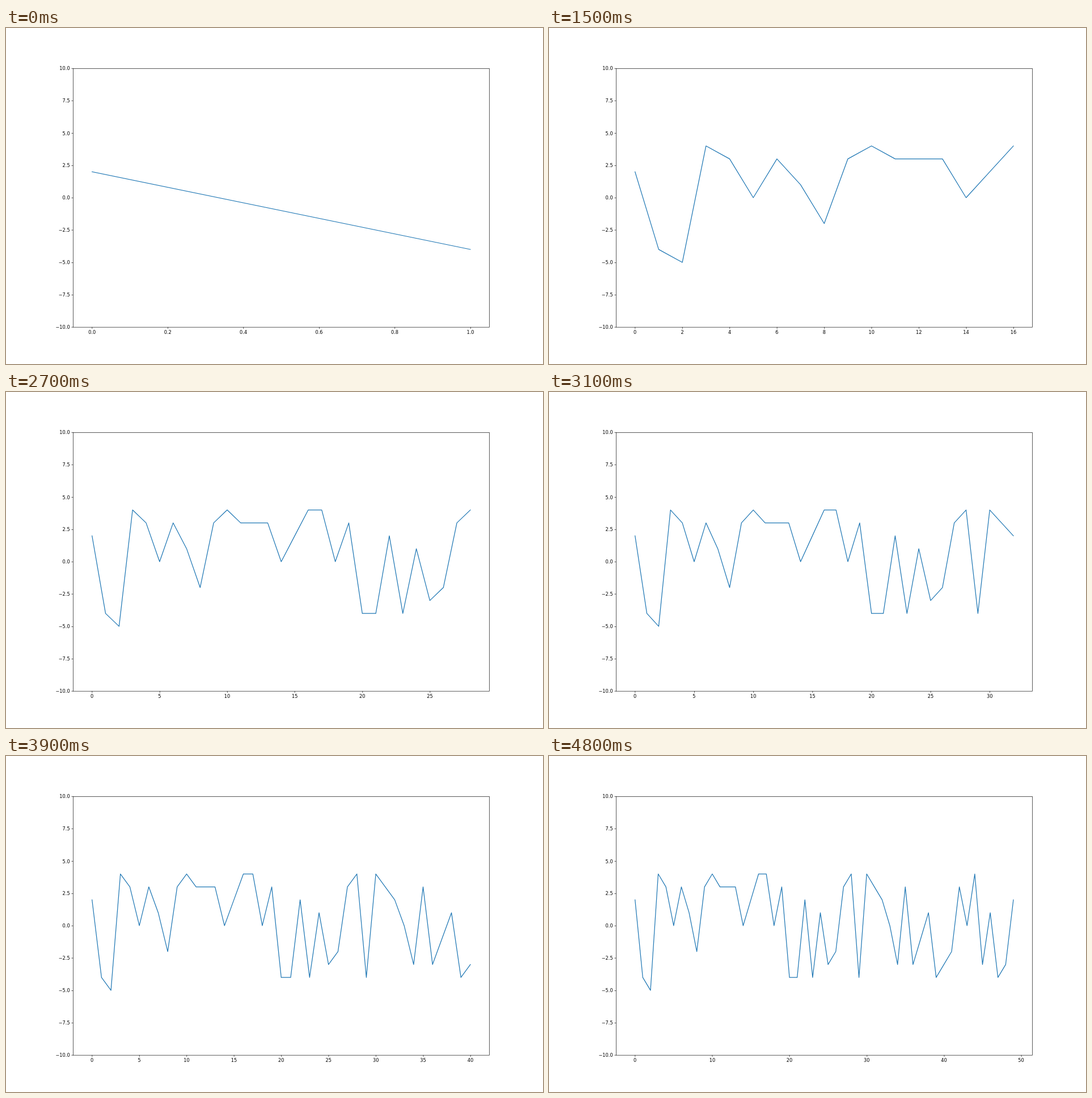
An HTML page with a canvas that plays this animation: 947x592 px, repeating every 4.9 s.

```html
<!DOCTYPE html>
<html lang="en">
<head>
<meta charset="utf-8">
<title>Growing line chart</title>
<style>
  html, body { margin: 0; width: 100%; height: 100%; overflow: hidden; background: #fff; }
  canvas { display: block; width: 947px; height: 592px; }
</style>
</head>
<body>
<canvas id="chart" width="947" height="592"></canvas>
<script>
const ctx = document.getElementById('chart').getContext('2d');

// The figure is laid out on a 1600 x 1000 sheet and scaled to the stage.
const SHEET = { w: 1600, h: 1000 };
const BOX = { left: 200, right: 1440, top: 120, bottom: 890 };
const STEP_MS = 100;
const MARGIN = 0.05;
const TICK = 4.86, PAD = 9.72, FONT = 13.89;

const data = [
  2, -4, -5, 4, 3, 0, 3, 1, -2, 3,
  4, 3, 3, 3, 0, 2, 4, 4, 0, 3,
  -4, -4, 2, -4, 1, -3, -2, 3, 4, -4,
  4, 3, 2, 0, -3, 3, -3, -1, 1, -4,
  -3, -2, 3, 0, 4, -3, 1, -4, -3, 2
];
const steps = data.length - 1;

const snap = v => Math.floor(v + 0.5) + 0.5;
const label = (v, digits) => v.toFixed(digits).replace('-', '\u2212');
const yPos = v => BOX.bottom - (v + 10) / 20 * (BOX.bottom - BOX.top);

// Smallest round interval that leaves at most nine gaps on the axis.
function niceStep(range) {
  const raw = range / 9;
  const power = 10 ** Math.floor(Math.log10(raw));
  return [1, 2, 2.5, 5, 10].find(s => s * power >= raw - 1e-9) * power;
}

function decimals(step) {
  let d = 0;
  while (Math.abs(step * 10 ** d - Math.round(step * 10 ** d)) > 1e-6) d++;
  return d;
}

function segment(x1, y1, x2, y2) {
  ctx.beginPath();
  ctx.moveTo(x1, y1);
  ctx.lineTo(x2, y2);
  ctx.stroke();
}

function drawLine(last, xPos) {
  ctx.strokeStyle = '#1f77b4';
  ctx.lineWidth = 2.083;
  ctx.lineJoin = 'round';
  ctx.lineCap = 'square';
  ctx.beginPath();
  for (let i = 0; i <= last; i++) ctx.lineTo(xPos(i), yPos(data[i]));
  ctx.stroke();
}

function drawAxes(last, xPos) {
  ctx.strokeStyle = ctx.fillStyle = '#000';
  ctx.lineWidth = 1.1;
  ctx.lineCap = 'butt';
  ctx.lineJoin = 'miter';
  ctx.font = FONT + 'px "DejaVu Sans", sans-serif';
  ctx.textBaseline = 'alphabetic';

  ctx.strokeRect(snap(BOX.left), snap(BOX.top), BOX.right - BOX.left, BOX.bottom - BOX.top);

  ctx.textAlign = 'right';
  for (let v = -10; v <= 10; v += 2.5) {
    const y = snap(yPos(v));
    segment(BOX.left - TICK, y, BOX.left, y);
    ctx.fillText(label(v, 1), BOX.left - PAD, y + 5);
  }

  ctx.textAlign = 'center';
  const step = niceStep(last * (1 + 2 * MARGIN));
  const digits = decimals(step);
  const count = Math.floor(last * (1 + MARGIN) / step + 1e-9);
  for (let i = 0; i <= count; i++) {
    const x = xPos(i * step);
    segment(snap(x), BOX.bottom, snap(x), BOX.bottom + TICK + 0.5);
    ctx.fillText(label(i * step, digits), x, BOX.bottom + PAD + 10.6);
  }
}

function draw(last) {
  const span = last * (1 + 2 * MARGIN);
  const xPos = v => BOX.left + (v + last * MARGIN) / span * (BOX.right - BOX.left);
  ctx.setTransform(947 / SHEET.w, 0, 0, 592 / SHEET.h, 0, 0);
  ctx.fillStyle = '#fff';
  ctx.fillRect(0, 0, SHEET.w, SHEET.h);
  drawLine(last, xPos);
  drawAxes(last, xPos);
}

let start = null;
function tick(now) {
  if (start === null) start = now;
  draw(Math.floor((now - start + 0.01) / STEP_MS) % steps + 1);
  requestAnimationFrame(tick);
}

draw(1);
requestAnimationFrame(tick);
</script>
</body>
</html>
```
